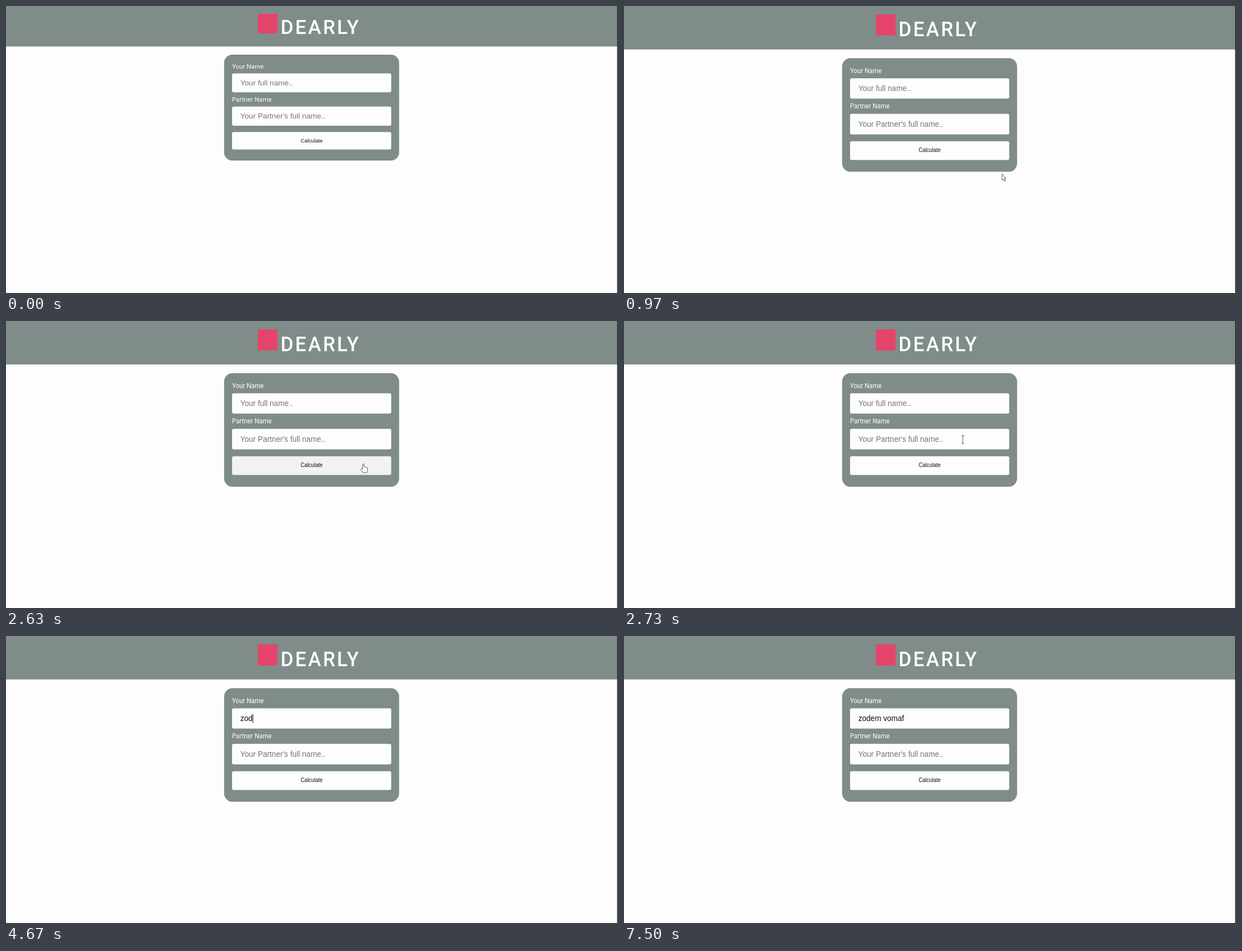
An HTML page that plays this animation: 1091 px wide and 513 px high, repeating every 8 s.

```html
<!DOCTYPE html>
<html lang="en">
<head>
<meta charset="utf-8">
<title>Name match</title>
<style>
  html, body { margin: 0; width: 100%; height: 100%; overflow: hidden; background: #fdfdfd; }
  svg { display: block; width: 1091px; height: 513px; }
  text { white-space: pre; }
  .panel { fill: #7f8c8a; }
  .box { fill: #fdfdfd; }
  .title { font: 500 35px Roboto, sans-serif; letter-spacing: 3.2px; fill: #fdfdfd; }
  .label { font: 11.4px Roboto, sans-serif; fill: #fdfdfd; }
  .field { font: 13.6px "Liberation Sans", Arial, sans-serif; fill: #111; }
  .hint { fill: #757575; }
  .button { font: 9.45px "Liberation Sans", Arial, sans-serif; text-anchor: middle; fill: #111; }
  #page { animation: settle 8s step-end infinite; }
  @keyframes settle {
    0% { transform: scaleY(1); }
    0.375%, 100% { transform: scaleY(1.073); }
  }
  .cursor path { fill: #fff; stroke: #4a4a4a; stroke-width: .9; stroke-linejoin: round; }
  #beam path { fill: none; }
</style>
</head>
<body>
<svg viewBox="0 0 1091 513">
  <g id="page">
    <rect class="panel" width="1090" height="72.4"/>
    <rect x="449" y="14" width="35" height="35" fill="#e5446b"/>
    <text class="title" x="489.5" y="50">DEARLY</text>

    <rect class="panel" x="388.8" y="86.9" width="312" height="189.3" rx="14.5"/>
    <text class="label" x="403" y="112">Your Name</text>
    <rect class="box" x="403" y="120.5" width="283.7" height="33.8" rx="3"/>
    <text class="field hint" id="hint" x="417.7" y="142">Your full name..</text>
    <text class="field" id="typed" x="417.7" y="142"></text>
    <rect id="caret" y="129.5" width="1" height="15.5" fill="#111"/>

    <text class="label" x="403" y="171">Partner Name</text>
    <rect class="box" x="403" y="179.7" width="283.7" height="34.2" rx="3"/>
    <text class="field hint" x="417.7" y="201">Your Partner's full name..</text>

    <rect class="box" id="button" x="403" y="225.2" width="283.7" height="31.4" rx="3"/>
    <text class="button" x="544.9" y="243.6">Calculate</text>
  </g>
  <rect x="1089.5" width="1.5" height="513" fill="#2b2b2b"/>

  <g class="cursor" id="arrow"><path d="M0 0V11.5L2.5 9.2 4.4 13.4 6.1 12.6 4.3 8.5H7Z"/></g>
  <g class="cursor" id="hand"><path d="M-1.2 1Q0-.5 1.2 1V6Q2.5 5 3.5 6.4 5 5.7 5.8 7.2 8 6.6 8 9V12Q7.8 14 6.5 16H-.5Q-2-12 -.5 16L-4.5 10.5Q-5-8.5 -4.5 9.5-3 8.2-1.2 10Z"/></g>
  <g class="cursor" id="beam"><path d="M-2.5-7H2.5M0-7V7M-2.5 7H2.5"/></g>
</svg>
<script>
  const LOOP = 8000;
  const NAME = "zodem vomaf";
  const KEYS = [4330, 4600, 4670, 4900, 5200, 5530, 5830, 6130, 6670, 6830, 7030];
  const BLINK = 470;

  // Pointer hot spot: time, x, y, shape
  const MOVES = [
    [30, 674, 300, "arrow"],
    [2570, 663, 286, "arrow"],
    [2600, 650, 269, "hand"],
    [2630, 637, 255, "hand"],
    [2670, 622, 235, "arrow"],
    [2700, 604, 212, "beam"],
    [2770, 581, 184, "arrow"],
    [2830, 558, 158, "beam"],
    [2870, 543, 148, "beam"],
    [2930, 0, 0, "none"]
  ];

  const el = id => document.getElementById(id);
  const show = (id, on) => { el(id).style.display = on ? "" : "none"; };

  const pen = document.createElement("canvas").getContext("2d");
  pen.font = '13.6px "Liberation Sans", Arial, sans-serif';

  // Reshape the hand with plain rounded fingers
  el("hand").firstElementChild.setAttribute("d",
    "M-1.2 1Q0-.6 1.2 1V6Q2.6 5 3.4 6.5 5 5.7 5.7 7.2 7.5 6.7 7.5 8.8V12Q7.3 14 6 16H-.6L-4.4 10.6Q-4.9 9.2-3.6 8.7-2.5 8.5-1.2 10Z");

  function caretOn(t, last) {
    if (last) return t < last + BLINK;
    return t >= 3530 && t < 3970;
  }

  function draw(t) {
    const count = KEYS.filter(k => k <= t).length;
    const text = NAME.slice(0, count);
    el("typed").textContent = text;
    show("hint", !count);
    el("caret").setAttribute("x", 417.7 + pen.measureText(text).width);
    show("caret", caretOn(t, KEYS[count - 1]));

    const [, x, y, shape] = MOVES.filter(m => m[0] <= t).pop() || [0, 0, 0, "none"];
    for (const id of ["arrow", "hand", "beam"]) {
      show(id, id === shape);
      el(id).setAttribute("transform", `translate(${x} ${y})`);
    }
    el("button").style.fill = shape === "hand" ? "#f4f1f2" : "";
  }

  const settle = el("page").getAnimations()[0];
  const start = performance.now();
  settle.startTime = start;

  function tick() {
    draw((performance.now() - start) % LOOP);
    requestAnimationFrame(tick);
  }
  tick();
</script>
</body>
</html>
```
